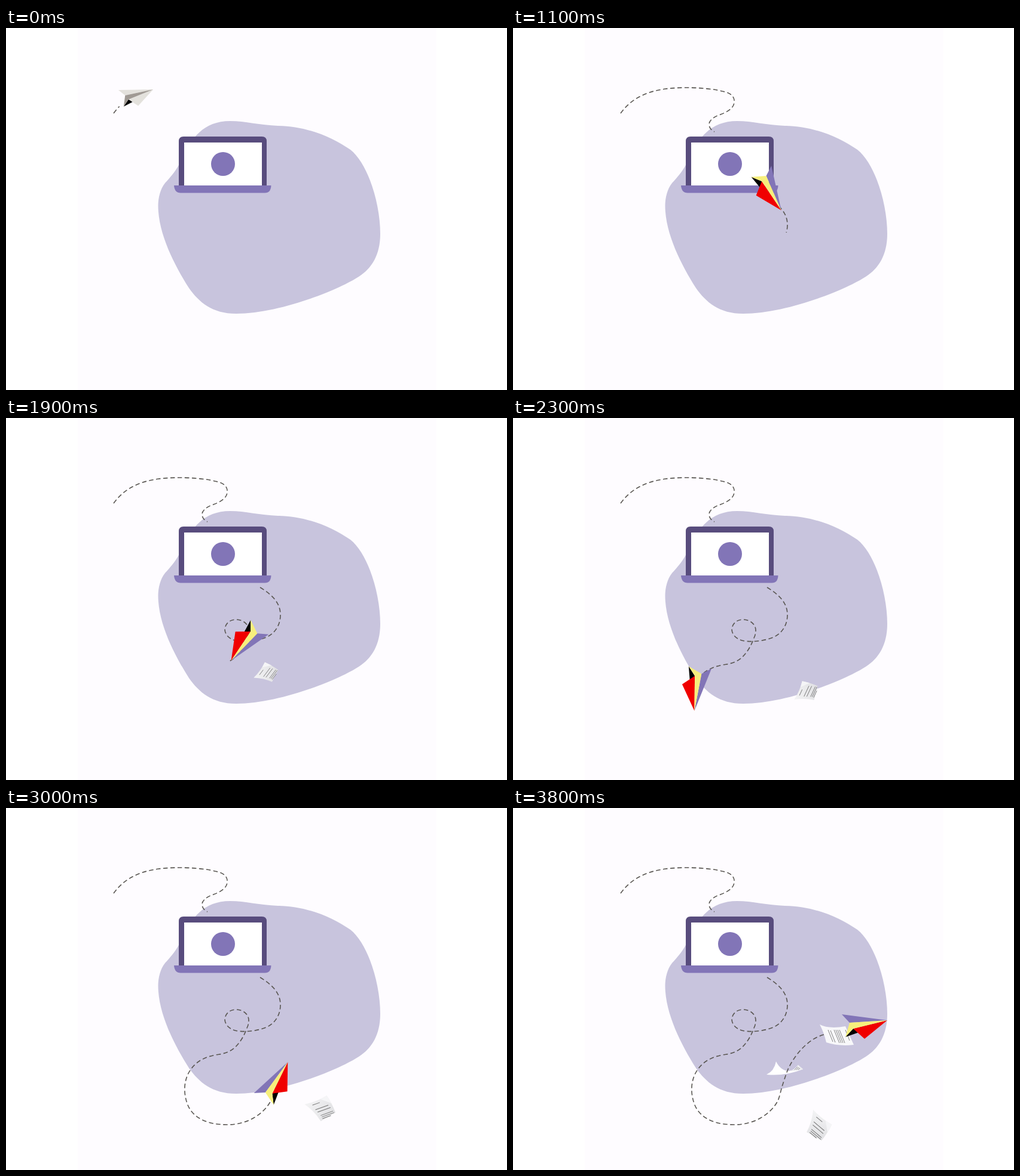
Write an HTML page that moves like this. It is 838 px wide and 607 px high and loops after 3.9 s.

```html
<!DOCTYPE html>
<html lang="en">
<head>
<meta charset="utf-8">
<title>Paper plane</title>
<style>
html, body { margin: 0; width: 100%; height: 100%; overflow: hidden; background: #fff; }
svg { display: block; width: 838px; height: 607px; }
</style>
</head>
<body>
<svg viewBox="0 0 838 607" xmlns="http://www.w3.org/2000/svg">
  <defs>
    <linearGradient id="shade" x1="0" y1="0" x2="1" y2="1">
      <stop offset="0" stop-color="#f4f4f5"/>
      <stop offset="1" stop-color="#dfdfe2"/>
    </linearGradient>
  </defs>
  <rect x="120" width="600" height="607" fill="#fefcff"/>
  <path fill="#c8c4dd" d="M375 156C400 156 425 163 455 164C505 165 545 183 576 204C606 228 626 295 626 345C626 380 612 403 590 417C560 437 460 479 385 479C345 479 323 460 306 436C282 398 254.500 345 254.500 298C254.500 285 258 270 266 260C280 245 287 235 295 218C310 185 330 156 375 156Z"/>

  <g id="curl">
    <path fill="#fff" d="M-30 9Q-17 3 -14 -13Q-6 3 8 3Q16 2 23 -7L31 0Q1 12 -30 9Z"/>
    <path fill="#ececef" d="M8 3Q16 2 23 -7L31 0Q20 4 8 3Z"/>
    <path stroke="#777" stroke-width=".8" d="M17 1l5-5M20 1l4-4M23 1l3-3"/>
  </g>
  <g id="trails" fill="none" stroke="#595652" stroke-width="1.6"></g>
  <g id="grey"></g>

  <path fill="#584c7d" d="M289 265V190Q289 182 297 182H428Q436 182 436 190V265Z"/>
  <rect x="298" y="192" width="130" height="72" fill="#fff"/>
  <path fill="#8275b7" d="M281 264H443.500Q443 276.500 433 276.500H292Q282 276.500 281 264Z"/>
  <circle cx="363" cy="228" r="20" fill="#8275b7"/>

  <g id="letter">
    <path fill="url(#shade)" d="M-23 -15Q-3 -12 17 -16Q21 0 21 16Q7 17 -7 21Q-11 2 -23 -15Z"/>
    <path fill="#f5f5f7" d="M5 -14L17 -16L20 -1Z"/>
    <path stroke="#777" d="M-11 -9H2M-9 0H14M-7 5H16M-4 12H18M-3 15H19M-3 18H12"/>
  </g>
  <g id="page">
    <path fill="#f8f8fa" d="M-28 -18Q-13 -10 15 -15L29 16Q4 19 -17 12Q-21 -5 -28 -18Z"/>
    <path stroke="#777" stroke-width=".9" d="M-14 -9l8 20M-10 -8l8 20M-4 -9l9 22M-1 -9l9 22M2 -9l9 22M5 -9l9 22M15 -9l7 18"/>
  </g>
  <g id="bright"></g>
</svg>
<script>
const LOOP = 3900, STEP = 100;
const byId = id => document.getElementById(id);

function add(parent, tag, attrs) {
  const el = document.createElementNS('http://www.w3.org/2000/svg', tag);
  for (const k in attrs) el.setAttribute(k, attrs[k]);
  return parent.appendChild(el);
}

function show(el, on) { el.style.display = on ? '' : 'none'; }

// Linear interpolation over [time, ...values] rows, held at both ends.
function tween(rows, t) {
  const i = rows.findIndex(r => r[0] >= t);
  if (i <= 0) return rows[i ? rows.length - 1 : 0].slice(1);
  const a = rows[i - 1], b = rows[i], k = (t - a[0]) / (b[0] - a[0]);
  return a.slice(1).map((v, j) => v + (b[j + 1] - v) * k);
}

const measure = d => add(byId('trails'), 'path', { d, stroke: 'none' });

// A flight is a chain of curves, each flown at even speed until its time.
function makeFlight(from, start, legs) {
  let d = start, path;
  const rows = [[from, 0]];
  for (const [time, curve] of legs) {
    path = measure(d += curve);
    rows.push([time, path.getTotalLength()]);
  }
  return { from, path, flown: t => tween(rows, t)[0] };
}

function makeTrail(flight, d, lead) {
  const el = add(byId('trails'), 'path', { d });
  return { flight, el, lead, len: el.getTotalLength() };
}

function makePlane(id, [top, mid, low]) {
  const g = byId(id);
  const poly = (fill, points) => add(g, 'polygon', { fill, points });
  poly('#000', '-70,28 -57,14 -47,20');
  poly(top, '0,0 -76,-10 -63,4');
  poly(low, '0,0 -57,14 -38,31');
  poly(mid, '0,0 -63,4 -70,28 -57,14');
  return g;
}

const hook = 'C369 135 358 141 347 145C335 149 327 156 328 163';
const swirl = 'C448 298 459 312 459 330C459 350 447 364 432 369C415 375 395 376 383 373' +
  'C372 370 366 362 366 354C367 344 375 338 384 338C397 338 406 346 406 356C406 361 405 365 403 369';
const drop = 'C399 380 394 389 388 396C380 406 370 411 357 413C335 416 316 424 305 445';
const bend = 'C297 461 297 480 304 498C314 522 340 531 370 531C405 531 431 513 443 491C446 484 448 474 450 467';
const rise = 'C453 458 456 448 460 438C468 420 490 388 520 380';

const arrive = makeFlight(0, 'M213.500 115.500', [
  [400, 'C245 103 270 100 290 100C312 100 335 101 353 102.500'],
  [800, 'C366 107 371 116 370 125' + hook + 'C329 175 340 190 350 215']
]);
const leave = makeFlight(900, 'M395 235', [
  [1100, 'L424 267'],
  [1900, 'L425 284' + swirl],
  [2300, drop],
  [3000, bend],
  [3600, rise + 'C540 376 560 372 581 366']
]);

// The lead is how far the drawn line runs ahead of the plane.
const trails = [
  makeTrail(arrive, 'M180 143C205 108 245 100 290 100C310 100 335 102 350 106C366 109 371 116 370 125' +
    hook + 'C329 169 333 172 337 174', [[0, 15]]),
  makeTrail(leave, 'M425 284' + swirl + drop + bend + rise, [[1100, 30], [1900, -8], [2300, -80]])
];

const planes = [
  { flight: arrive, until: 800, size: [[0, .76]], el: makePlane('grey', ['#e3e1dc', '#a09a94', '#e3e1dc']) },
  { flight: leave, until: LOOP, size: [[900, .4], [1100, 1]], el: makePlane('bright', ['#8275b7', '#f7ef7c', '#f00000']) }
];
const turns = [[0, -8.5], [400, 62.5], [600, 155], [1100, 70], [1500, 187],
  [1900, 497.5], [2300, 464.5], [3000, 310], [3600, 360]];

// Poses: time, x, y, angle, size.
const papers = [
  ['letter', [[1600, 416, 380, -45, .7], [1900, 435, 428, -53, .8], [2300, 490, 460, -65, .85],
    [3000, 526, 503, -20, 1], [3700, 510, 532, 40, 1]]],
  ['curl', [[3100, 460, 436, -30, 1], [3700, 454, 438, 0, 1]]],
  ['page', [[3500, 555, 376, -20, .9], [3800, 541, 381, 0, 1]]]
].map(([id, rows]) => ({ el: byId(id), rows }));

function place(el, x, y, angle, size, shift = '') {
  el.setAttribute('transform', `translate(${x} ${y}) rotate(${angle}) scale(${size}) ${shift}`);
}

function drawTrail({ flight, el, lead, len }, t) {
  const head = Math.min(flight.flown(t) + tween(lead, t)[0], len);
  show(el, t >= flight.from);
  const dashes = [];
  for (let s = 0; s < head; s += 12) dashes.push(Math.min(7.5, head - s), 4.5);
  el.setAttribute('stroke-dasharray', dashes.concat(0, 2000).join(' '));
}

function drawPlane({ flight, until, size, el }, t) {
  show(el, t >= flight.from && t < until);
  const p = flight.path.getPointAtLength(flight.flown(t));
  place(el, p.x, p.y, tween(turns, t)[0], tween(size, t)[0], 'translate(45 -10)');
}

function drawPaper({ el, rows }, t) {
  show(el, t >= rows[0][0]);
  place(el, ...tween(rows, t));
}

function draw(time) {
  const t = Math.floor(time % LOOP / STEP) * STEP;
  trails.forEach(x => drawTrail(x, t));
  planes.forEach(x => drawPlane(x, t));
  papers.forEach(x => drawPaper(x, t));
}

const start = performance.now();
function tick() {
  draw(performance.now() - start);
  requestAnimationFrame(tick);
}
tick();
</script>
</body>
</html>
```
